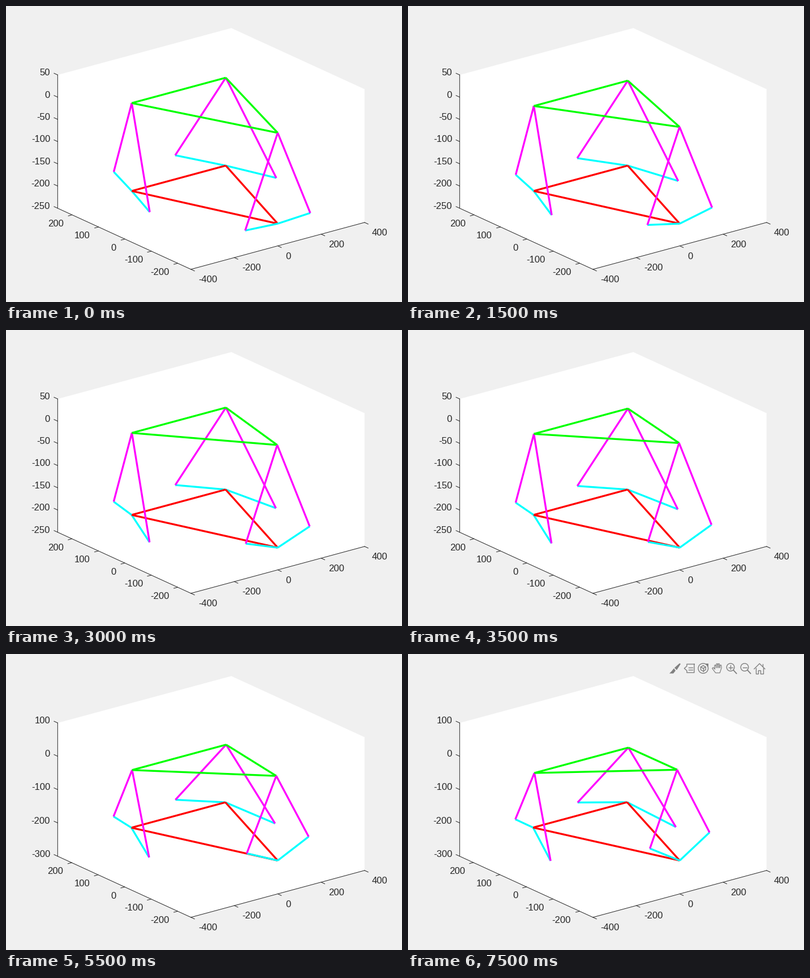
Write a matplotlib script that moves like this. It is 700 px wide and 525 px high and loops after 8000 ms.

```python
import numpy as np
import matplotlib.pyplot as plt
from matplotlib.animation import FuncAnimation
from matplotlib.patches import Circle, Polygon

W, H = 700, 525
PX = 0.72                      # points per pixel at 100 dpi
INK, ICON = "#262626", "#808080"

plt.rcParams["font.family"] = "Liberation Sans"
fig = plt.figure(figsize=(7, 5.25), dpi=100, facecolor="#f0f0f0")
ax = fig.add_axes([0, 0, 1, 1])
ax.set_xlim(0, W)
ax.set_ylim(H, 0)
ax.axis("off")

# Orthographic view of a unit cube, stretched to fill the axes rectangle
AZ, EL = np.radians([37.5, 30])
BOX_LEFT, BOX_BOTTOM = 91.3, 467
BOX_W, BOX_H = 0.775 * W, 0.815 * H
EDGES = np.array([[np.cos(AZ), -np.sin(AZ) * np.sin(EL)],
                  [-np.sin(AZ), -np.cos(AZ) * np.sin(EL)],
                  [0, -np.cos(EL)]])
EDGES *= np.array([BOX_W, BOX_H]) / np.abs(EDGES).sum(axis=0)
EX, EY, EZ = EDGES
TO_EYE = np.array([-np.sin(AZ) * np.cos(EL), -np.cos(AZ) * np.cos(EL), np.sin(EL)])

FRONT = np.array([BOX_LEFT - EY[0], BOX_BOTTOM])
LEFT, RIGHT = FRONT + EY, FRONT + EX
WALLS = [FRONT, RIGHT, RIGHT + EZ, RIGHT + EY + EZ, LEFT + EZ, LEFT]
ax.add_patch(Polygon(WALLS, fc="white", ec="none", zorder=0))


def stroke(pts, width=1.0, color=INK, z=1, **kw):
    xs, ys = zip(*pts)
    return ax.plot(xs, ys, color=color, lw=width * PX, zorder=z, **kw)[0]


stroke([LEFT + EZ, LEFT, FRONT, RIGHT])

# Platform geometry
RADIUS, ARM, LEG, HEIGHT = 250, 150, 250, 200
ANGLES = np.radians([150, 30, -90])
BASE = np.array([[RADIUS * np.cos(a), RADIUS * np.sin(a), -HEIGHT] for a in ANGLES])
TANGENT = np.array([[-np.sin(a), np.cos(a), 0] for a in ANGLES])
UP = np.array([0, 0, 1])


def platform(tilt):
    c, s = np.cos(tilt), np.sin(tilt)
    flat = BASE + HEIGHT * UP
    return flat @ np.array([[1, 0, 0], [0, c, -s], [0, s, c]])


def knee(base, top, along):
    """End of the arm that lets a leg of fixed length reach the top joint."""
    d = top - base
    u, v = d @ along, d[2]
    reach = (d @ d + ARM ** 2 - LEG ** 2) / (2 * ARM)
    a = np.arctan2(v, u) - np.arccos(reach / np.hypot(u, v))
    return base + ARM * (np.cos(a) * along + np.sin(a) * UP)


def pose(tilt):
    top = platform(tilt)
    segs = []
    for i in range(3):
        j = (i + 1) % 3
        segs += [(BASE[i], BASE[j], "#ff0000"), (top[i], top[j], "#00ff00")]
        for side in (1, -1):
            k = knee(BASE[i], top[i], side * TANGENT[i])
            segs += [(BASE[i], k, "#00ffff"), (k, top[i], "#ff00ff")]
    return segs


rods = [stroke([(0, 0), (0, 0)], 3.33, col, solid_capstyle="butt")
        for _, _, col in pose(0)]


class Tick:
    def __init__(self, ha):
        self.mark = stroke([(0, 0), (0, 0)])
        self.text = ax.text(0, 0, "", color=INK, fontsize=12, ha=ha, va="baseline")

    def place(self, at, step, offset, value):
        self.mark.set_data(*zip(at, at + step))
        self.text.set_position(np.round(at + offset))
        self.text.set_text(f"{value:d}")

    def show(self, on):
        self.mark.set_visible(on)
        self.text.set_visible(on)


ALONG_X = 7 * EX / np.hypot(*EX)
ALONG_Y = 7 * EY / np.hypot(*EY)
xticks = [Tick("left") for _ in range(5)]
yticks = [Tick("right") for _ in range(5)]
zticks = [Tick("right") for _ in range(7)]
for i, t in enumerate(xticks):
    t.place(FRONT + EX * i / 4, -ALONG_Y, (13.3, 23.2), -400 + 200 * i)

# Toolbar: seven icons on an even pitch, drawn around their centres
tools = []
BRUSH, TIP, ROTATE, HAND, ZOOM_IN, ZOOM_OUT, HOME = [
    np.array([472 + 24.9 * i, 25.5]) for i in range(7)]


def icon(at, pts, width=1.4):
    tools.append(stroke(at + np.array(pts), width, ICON, 9))


def ring(at, r):
    tools.append(ax.add_patch(Circle(at, r, fc="none", ec=ICON, lw=1.4 * PX, zorder=9)))


def blob(at, pts):
    tools.append(ax.add_patch(Polygon(at + np.array(pts), fc=ICON, ec="none", zorder=9)))


def mirror(pts):
    return pts + [(-x, y) for x, y in reversed(pts)]


blob(BRUSH, [(8, -9), (10, -8), (3, 3), (-1, -1)])
blob(BRUSH, [(-2, 0), (1, 4), (-3, 9), (-10, 9), (-6, 5)])

icon(TIP, [(9, -7.5), (-4, -7.5), (-4, -4), (-8.5, 0), (-4, 4), (-4, 7.5), (9, 7.5), (9, -7.5)])
for y in (-2, 2):
    icon(TIP, [(-1, y), (6, y)])

ring(ROTATE, 8.8)
spokes = [(5 * np.sin(a), -5 * np.cos(a)) for a in np.arange(7) * np.pi / 3]
icon(ROTATE, spokes)
for i in (1, 3, 5):
    icon(ROTATE, [(0, 0), spokes[i]])
blob(ROTATE, [(3, -9), (9, -9), (9, -3)])

# four finger arches, then the palm and thumb
palm = []
for i in range(4):
    x, tip = -5 + 3.2 * i, -8.5 + 1.2 * (i - 1.5) ** 2
    palm += [(x, -1), (x + 0.3, tip), (x + 2.3, tip), (x + 2.9, -1)]
icon(HAND, palm + [(4.5, 8), (-3, 8), (-9, 0), (-7.5, -1.5), (-4, 1.5), (-5, -1)], 1.2)

for at in (ZOOM_IN, ZOOM_OUT):
    ring(at - (1.5, 2), 6.8)
    icon(at, [(3.5, 3), (9, 9)], 1.8)
    icon(at, [(-5, -2), (2, -2)])
icon(ZOOM_IN, [(-1.5, -5.5), (-1.5, 1.5)])

icon(HOME, [(-9.5, 1), (0, -8.5), (9.5, 1)])
icon(HOME, mirror([(-6.5, -1), (-6.5, 9), (-2, 9), (-2, 3)]))
icon(HOME, [(6, -3.5), (6, -8)])


def update(k):
    segs = pose(np.radians(k + 1))
    pts = np.array([p for a, b, _ in segs for p in (a, b)])
    ymax, ztop = pts[:, 1:].max(axis=0)
    zmin, zmax, zstep = (-300, 100, 100) if ztop > 50 else (-250, 50, 50)
    low = np.array([-400, -RADIUS, zmin])
    span = np.array([400, ymax, zmax]) - low

    def unit(p):
        return (p - low) / span

    for rod, (a, b, _) in zip(rods, segs):
        rod.set_data(*zip(FRONT + unit(a) @ EDGES, FRONT + unit(b) @ EDGES))
        rod.set_zorder(4 + unit((a + b) / 2) @ TO_EYE)

    for i, t in enumerate(yticks):
        y = 200 - 100 * i
        t.place(FRONT + EY * (y + RADIUS) / span[1], -ALONG_X, (-14.9, 20.4), y)
    for i, t in enumerate(zticks):
        z = zmin + zstep * i
        t.place(LEFT + EZ * (z - zmin) / span[2], ALONG_Y, (-13.5, 1), z)
        t.show(z <= zmax)
    for part in tools:
        part.set_visible(k >= 13)
    return []


anim = FuncAnimation(fig, update, frames=16, interval=500, repeat=True,
                     repeat_delay=0, blit=False)
plt.show()
```
